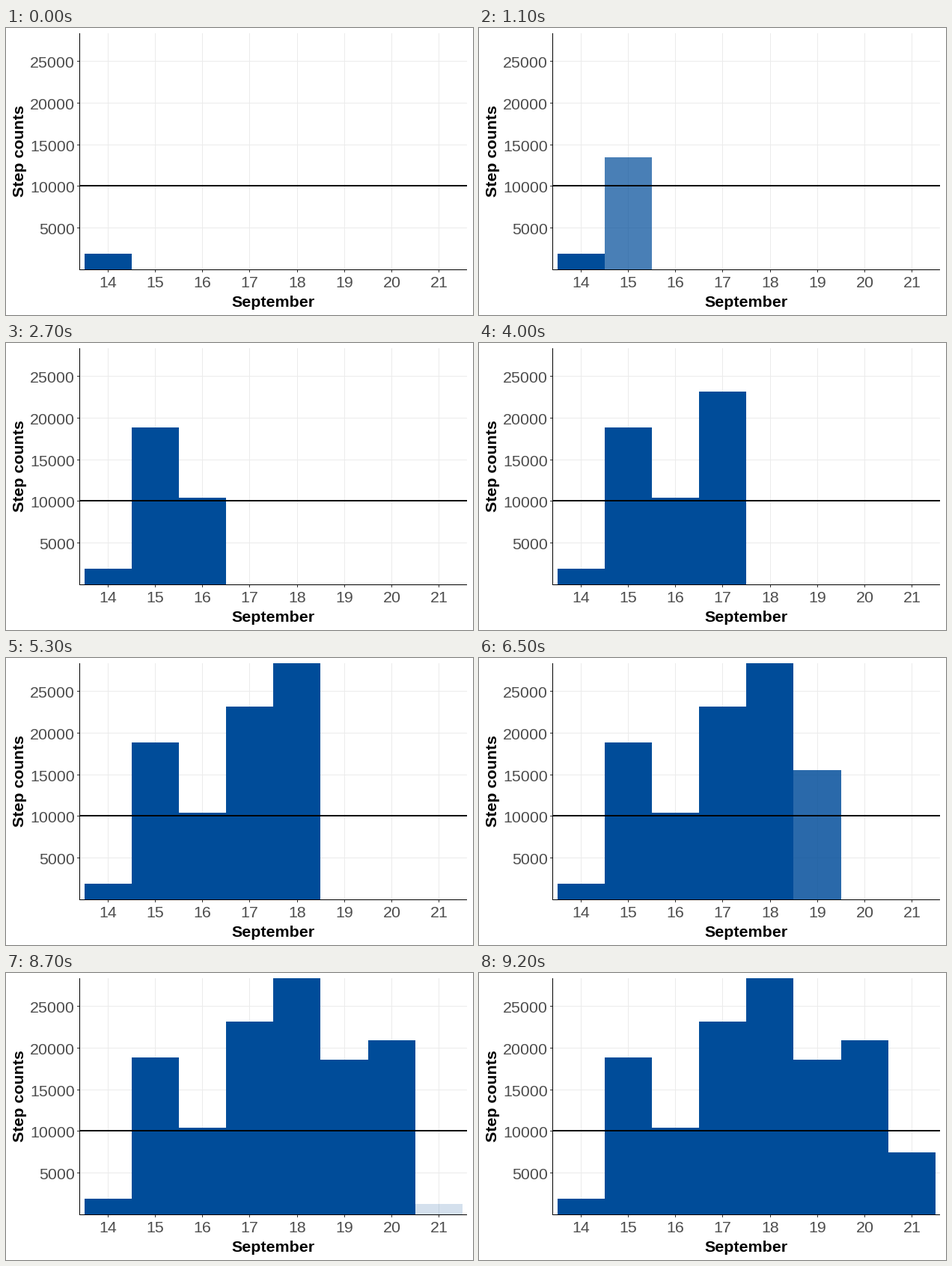
Recreate the animation shown at these times as a matplotlib script. Size 624x384 px, loop 10 s.

```python
import matplotlib.pyplot as plt
from matplotlib.animation import FuncAnimation
from matplotlib.patches import Rectangle

W, H, DPI = 624, 384, 96
LEFT, RIGHT, TOP, BASE = 98, 616, 7, 323
FRAMES, INTERVAL = 100, 100

EDGES = [105, 168, 231, 294, 357, 420, 484, 547, 610]
TOPS = [302, 113, 207, 65, 7, 116, 90, 240]
STARTS = [-1, 7, 21, 35, 48, 61, 74, 87]  # first visible step of each bar
STEPS = [1, 7, 7, 6, 6, 6, 6, 6]          # steps to full height

plt.rcParams["font.family"] = "Liberation Sans"
fig = plt.figure(figsize=(W / DPI, H / DPI), dpi=DPI, facecolor="white")
ax = fig.add_axes([0, 0, 1, 1])
ax.set(xlim=(0, W), ylim=(H, 0))
ax.axis("off")


def box(x0, y0, x1, y1, color, z):
    return ax.add_patch(Rectangle((x0, y0), x1 - x0, y1 - y0,
                                  facecolor=color, linewidth=0, zorder=z))


def label(x, y, s, ha="center", color="#4D4D4D", **kw):
    ax.text(x, y, s, fontsize=16, ha=ha, va="baseline", color=color,
            rotation_mode="anchor", zorder=5, **kw)


# Horizontal grid, ticks and labels
for i, y in enumerate([267, 211, 156, 100, 44], 1):
    box(LEFT, y, RIGHT, y + 1, "#EBEBEB", 1)
    box(LEFT - 3, y, LEFT, y + 1, "#333333", 4)
    label(92, y + 9, str(5000 * i), ha="right")

# Vertical grid, ticks and labels
for i in range(8):
    x = int(136.5 + 63.15 * i)
    box(x, TOP, x + 1, BASE, "#EBEBEB", 1)
    box(x, BASE + 1, x + 1, BASE + 4, "#333333", 4)
    label(x + 0.5, 347, str(14 + i))

bars = [box(a, BASE, b, BASE, "#004C99", 2) for a, b in zip(EDGES, EDGES[1:])]

box(LEFT, 210, RIGHT, 212, "black", 3)
box(LEFT, TOP, LEFT + 1, BASE + 1, "black", 4)
box(LEFT, BASE, RIGHT, BASE + 1, "black", 4)

label(357, 373, "September", color="black", weight="bold")
label(24, 165, "Step counts", color="black", weight="bold", rotation=90)


def update(n):
    for bar, top, start, steps in zip(bars, TOPS, STARTS, STEPS):
        p = min(max((n - start + 1) / steps, 0), 1)
        y = round(BASE - (BASE - top) * p)
        bar.set_y(y)
        bar.set_height(BASE - y)
        bar.set_alpha(p)
    return bars


anim = FuncAnimation(fig, update, frames=FRAMES, interval=INTERVAL,
                     init_func=lambda: update(0), repeat=True, blit=False)
plt.show()
```
